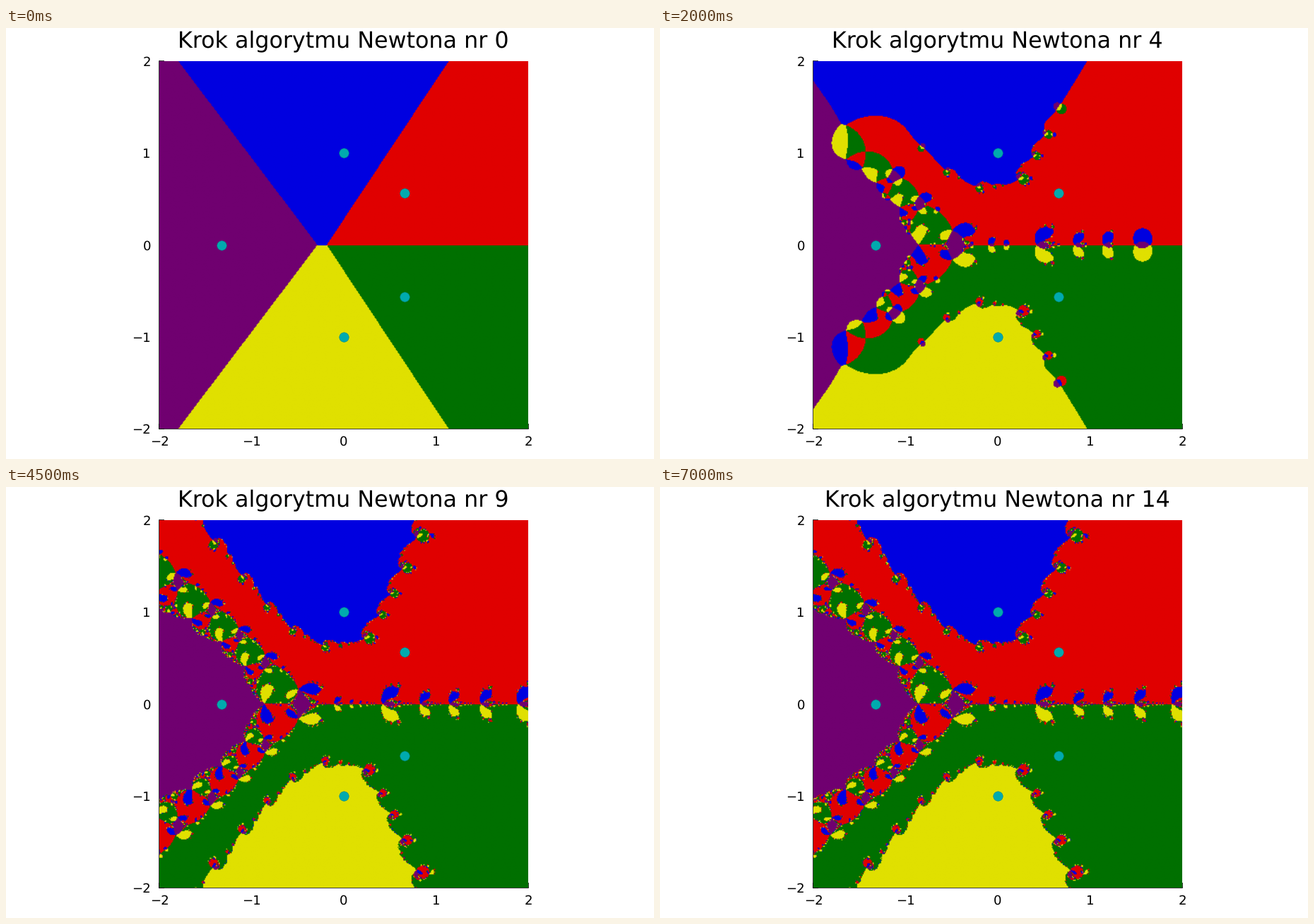
These frames come from a looping animation (917x611 px, 7.5 s). A matplotlib script:

```python
import numpy as np
import matplotlib.pyplot as plt
from matplotlib.animation import FuncAnimation
from matplotlib.colors import to_rgb

W, H, DPI = 917, 611, 64
LEFT, TOP = 217, 47
AX_W, AX_H = 522, 521
STEPS = 15
GRID = 401

# Roots of z^5 + z^2 - z + 1 and the colour of each basin
ROOTS = np.array([0.662358978622373 + 0.562279512062301j,
                  0.662358978622373 - 0.562279512062301j,
                  1j, -1j, -1.324717957244746])
COLORS = np.array([to_rgb(c) for c in
                   ("#e00000", "#007000", "#0000e0", "#e0e000", "#700070")])


def pt(px):
    return px * 72 / DPI


def newton(z):
    return z - (z**5 + z**2 - z + 1) / (5 * z**4 + 2 * z - 1)


def nearest_root(z):
    return np.argmin([np.abs(z - r) for r in ROOTS], axis=0)


def basins():
    axis = np.linspace(-2, 2, GRID)
    z = axis[None, :] + 1j * axis[:, None]
    maps = []
    with np.errstate(all="ignore"):
        for _ in range(STEPS):
            maps.append(COLORS[nearest_root(z)])
            z = newton(z)
    return maps


plt.rcParams.update({"font.family": "DejaVu Sans", "text.hinting": "none",
                     "axes.unicode_minus": True})

fig = plt.figure(figsize=(W / DPI, H / DPI), dpi=DPI, facecolor="white")
ax = fig.add_axes([LEFT / W, 1 - (TOP + AX_H) / H, AX_W / W, AX_H / H])

maps = basins()
edge = 2 + 2 / (GRID - 1)
image = ax.imshow(maps[0], extent=(-edge, edge, -edge, edge), origin="lower",
                  interpolation="bilinear", aspect="auto", zorder=2)
ax.plot(ROOTS.real, ROOTS.imag, "o", color="#00aaae", ms=pt(13.4),
        mec="#008a8e", mew=pt(0.6), zorder=3)

# The basins cover the inner half of the axis lines and ticks
ax.set(xlim=(-2, 2), ylim=(-2, 2), xticks=range(-2, 3), yticks=range(-2, 3))
ax.set_axisbelow(True)
ax.tick_params(direction="in", length=pt(7), width=pt(1.5),
               labelsize=pt(18.1))
ax.tick_params(axis="x", pad=pt(10))
ax.tick_params(axis="y", pad=pt(12))
for side, spine in ax.spines.items():
    spine.set(visible=side in ("left", "bottom"), linewidth=pt(1.5), zorder=1)

title = fig.text(477.5 / W, 1 - 27 / H, "", fontsize=pt(31.7),
                 ha="center", va="baseline")


def update(step):
    image.set_data(maps[step])
    title.set_text(f"Krok algorytmu Newtona nr {step}")
    return image, title


anim = FuncAnimation(fig, update, frames=STEPS, interval=500,
                     repeat=True, repeat_delay=0, blit=False)
plt.show()
```
